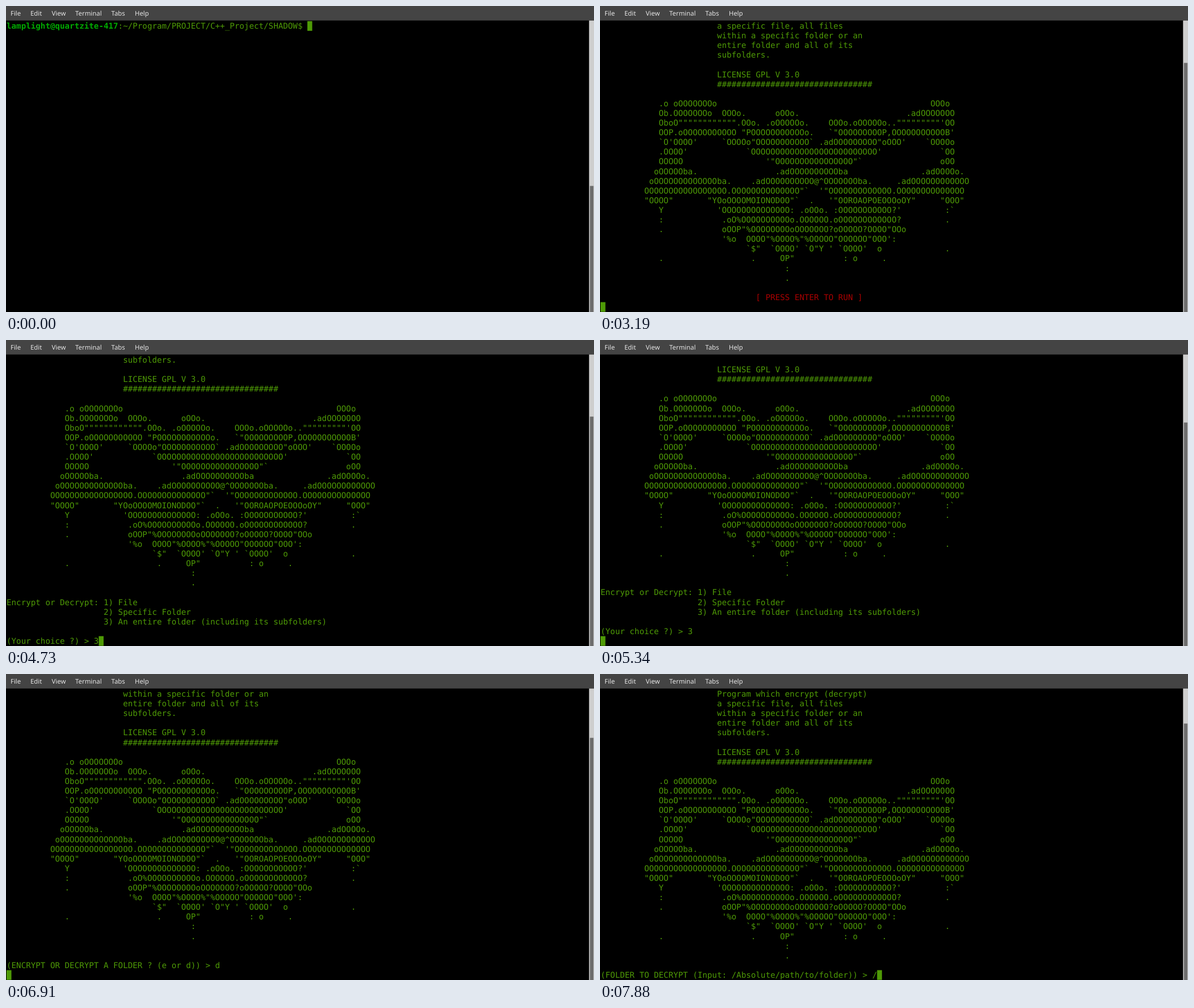
These frames come from a looping animation (1036x540 px, 8 s). An HTML page with a canvas:

```html
<!DOCTYPE html>
<html lang="en">
<head>
<meta charset="utf-8">
<title>Terminal session</title>
<style>
  html, body { margin: 0; width: 100%; height: 100%; overflow: hidden; background: #000; }
  canvas { display: block; }
</style>
</head>
<body>
<canvas id="stage" width="1036" height="540"></canvas>
<script>
const ctx = document.getElementById('stage').getContext('2d');
const LOOP = 8000, ROWS = 30;
const CELL_W = 8.548, CELL_H = 17.1, LEFT = 1, TOP = 26.7;
const GREEN = '#4e9a06', BOLD_GREEN = '#00aa00', RED = '#aa0000';
const MONO = '14.2px "DejaVu Sans Mono", monospace';

// A character followed by a number stands for a run of that character.
const expand = s => s.replace(/(.)(\d+)/g, (_, c, n) => c.repeat(n));
const indent = (n, s) => ' '.repeat(n) + s;

const intro = [
  'Program which encrypt (decrypt)',
  'a specific file, all files',
  'within a specific folder or an',
  'entire folder and all of its',
  'subfolders.',
  '',
  'LICENSE GPL V 3.0',
  '#'.repeat(32)
].map(s => indent(24, s));

const skull = [
  ' 12.o oO7o 44O3o',
  ' 12Ob.O7o  O3o. 6oO2o. 22.adO7',
  ' 12OboO"12.OOo. .oO5o. 4O3o.oO5o.."9\'OO',
  ' 12OOP.oO11 "PO11o. 3`"O9P,O11B\'',
  ' 12`O\'O4\' 5`O4o"O11` .adO9"oO3\' 4`O4o',
  ' 12.O4\' 12`O26\' 12`OO',
  ' 12O5 17\'"O16"` 16oOO',
  ' 11oO5ba. 16.adO10ba 15.adO4o.',
  ' 10oO13ba. 4.adO10@^O7ba. 5.adO12',
  ' 9O17.O14"`  \'"O13.O14',
  ' 9"O4" 7"YOoO4MOIONODOO"`  . 3\'"OOROAOPOEO3oOY" 5"O3"',
  ' 12Y 11\'O14: .oO2o. :O11?\' 9:`',
  ' 12: 12.oO%O10o.O6.oO12? 9.',
  ' 12. 12oOOP"%O8oO7?oO5?O4"OOo',
  ' 25\'%o  O4"%O4%"%O5"O6"O3\':',
  ' 30`$"  `O4\' `O"Y \' `O4\'  o 13.',
  ' 12. 18. 5OP" 10: o 5.',
  ' 38:',
  ' 38.'
].map(expand);

const header = ['', '', '', '', ...intro, '', ...skull, ''];

const menu = [
  'Encrypt or Decrypt: 1) File',
  indent(20, '2) Specific Folder'),
  indent(20, '3) An entire folder (including its subfolders)'),
  '',
  '(Your choice ?) > 3'
];
const question = '(ENCRYPT OR DECRYPT A FOLDER ? (e or d)) > d';
const folder = '(FOLDER TO DECRYPT (Input: /Absolute/path/to/folder)) > /';

// A line is plain text or a list of [text, colour, weight] spans.
const shell = cmd => [
  ['lamplight@quartzite-417', BOLD_GREEN, 'bold'],
  [':~/Program/PROJECT/C++_Project/SHADOW$ ' + cmd, GREEN]
];
const press = [[indent(32, '[ PRESS ENTER TO RUN ]'), RED]];

// Each step: start time, lines, and the length of the scrollback if longer.
const steps = [
  [0, [shell('')], 69],
  [500, [shell('.')], 69],
  [750, [shell('./')], 69],
  [800, [shell('./S')], 69],
  [950, [shell('./SHADOW ')], 69],
  [1250, [shell('./SHADOW '), ''], 69],
  [1350, ['']],
  [3190, [...header, press, '']],
  [3290, ['']],
  [3390, [...header, '']],
  [4730, [...header, ...menu]],
  [5340, [...header, ...menu, '']],
  [5440, ['']],
  [5540, [...header, '', '']],
  [6290, [...header, '', question]],
  [6910, [...header, '', question, '']],
  [7010, [''], 36],
  [7110, ['']],
  [7880, [...header, folder]]
];

function box(color, x, y, w, h) {
  ctx.fillStyle = color;
  ctx.fillRect(x, y, w, h);
}

// Draws one line on the character grid and returns the column after it.
function drawLine(line, row) {
  const spans = typeof line === 'string' ? [[line, GREEN]] : line;
  const y = TOP + row * CELL_H + 13.3;
  let col = 0;
  for (const [text, color, weight = 'normal'] of spans) {
    ctx.font = weight + ' ' + MONO;
    ctx.fillStyle = color;
    for (const ch of text) {
      if (ch !== ' ') ctx.fillText(ch, LEFT + col * CELL_W, y);
      col++;
    }
  }
  return col;
}

function drawMenuBar() {
  box('#444444', 0, 0, 1036, 25.6);
  ctx.font = '11.4px "Noto Sans", sans-serif';
  ctx.fillStyle = '#e4e4e4';
  const items = [['File', 8], ['Edit', 43], ['View', 80.5], ['Terminal', 122], ['Tabs', 185.5], ['Help', 227]];
  for (const [label, x] of items) ctx.fillText(label, x, 17);
}

function drawScrollbar(total) {
  const top = 27 + 514 * (1 - ROWS / total);
  box('#cecece', 1027.3, 25.6, 8.7, 514.4);
  box('#6d6d6d', 1028.8, top, 6.3, 540 - top);
}

function draw(t) {
  const [, lines, total = lines.length] = steps.filter(s => s[0] <= t).pop();
  ctx.textRendering = 'geometricPrecision';
  box('#000', 0, 0, 1036, 540);
  drawMenuBar();
  drawScrollbar(Math.max(total, ROWS));
  const view = lines.slice(-ROWS);
  let col = 0;
  view.forEach((line, row) => { col = drawLine(line, row); });
  box(GREEN, LEFT + col * CELL_W, TOP + (view.length - 1) * CELL_H, CELL_W, CELL_H);
}

function frame() {
  draw(performance.now() % LOOP);
  requestAnimationFrame(frame);
}
frame();
</script>
</body>
</html>
```
